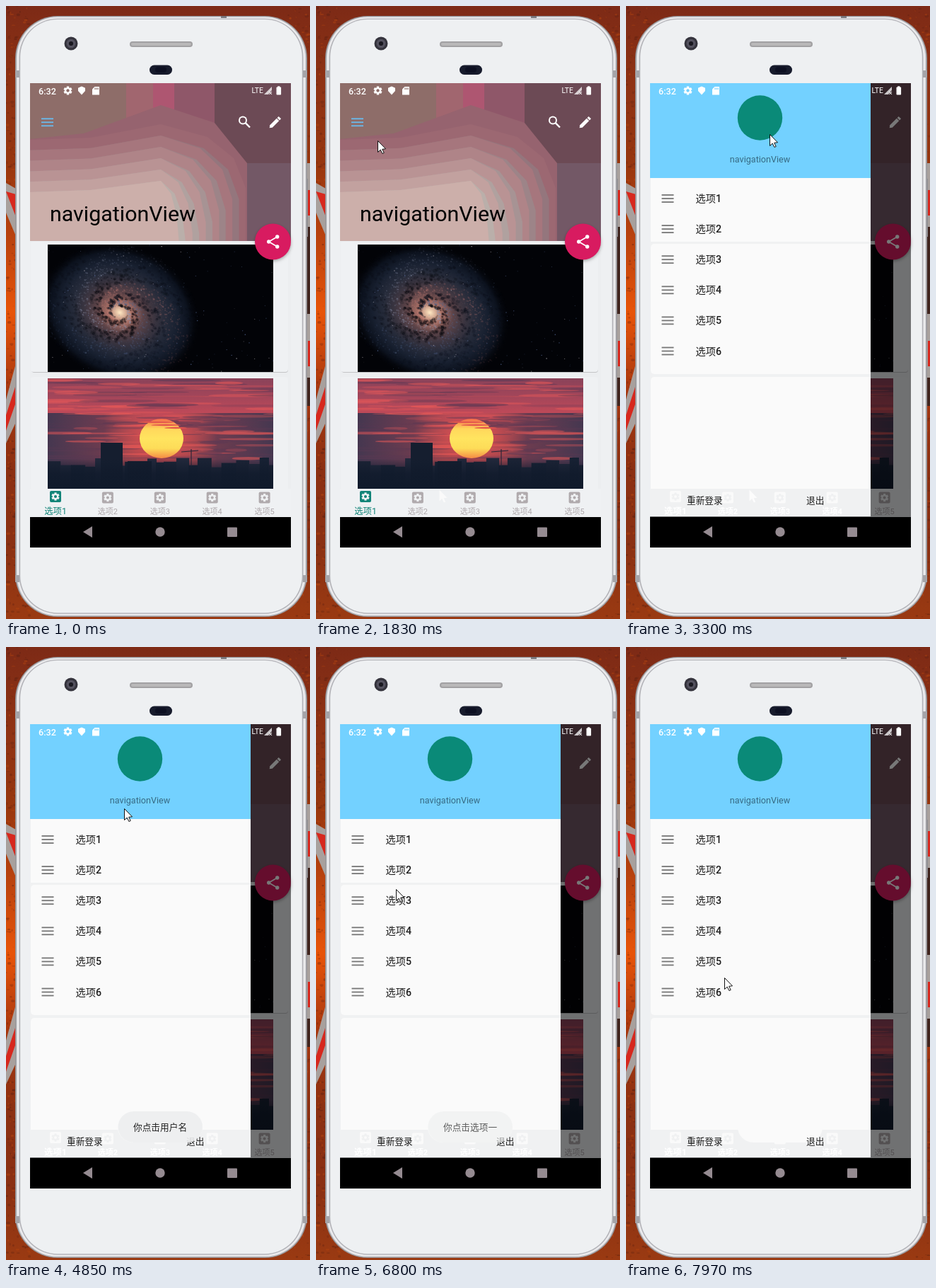
Recreate the animation shown at these times as an HTML page with a canvas. Size 430 by 866 pixels, loop 8000 ms.

```html
<!DOCTYPE html>
<html lang="zh">
<head>
<meta charset="utf-8">
<title>navigationView</title>
<style>
html, body { margin: 0; width: 100%; height: 100%; overflow: hidden; }
canvas { display: block; }
</style>
</head>
<body>
<canvas id="stage" width="430" height="866"></canvas>
<script>
const W = 430, H = 866, LOOP = 8000, TAU = Math.PI * 2;
const FONT = 'Roboto, "Noto Sans CJK SC", "Noto Sans CJK", sans-serif';
const screenCtx = document.getElementById('stage').getContext('2d');
let c = screenCtx;

let seed = 7;
const rnd = (a = 0, b = 1) => a + (b - a) * ((seed = (seed * 16807) % 2147483647) / 2147483647);
const ramp = (t, a, b) => Math.max(0, Math.min(1, (t - a) / (b - a)));
const mix = (a, b, k) => a + (b - a) * k;

function rect(x, y, w, h, color) {
  c.fillStyle = color;
  c.fillRect(x, y, w, h);
}
function round(x, y, w, h, r, color) {
  c.beginPath();
  c.roundRect(x, y, w, h, r);
  c.fillStyle = color;
  c.fill();
}
function oval(x, y, rx, ry, color) {
  c.beginPath();
  c.ellipse(x, y, rx, ry, 0, 0, TAU);
  c.fillStyle = color;
  c.fill();
}
const disc = (x, y, r, color) => oval(x, y, r, r, color);
function trace(pts) {
  c.beginPath();
  for (let i = 0; i < pts.length; i += 2) c.lineTo(pts[i], pts[i + 1]);
}
function poly(pts, color) {
  trace(pts);
  c.fillStyle = color;
  c.fill();
}
function line(pts, color, width) {
  trace(pts);
  c.strokeStyle = color;
  c.lineWidth = width;
  c.stroke();
}
function text(s, x, y, size, color, weight = 400, align = 'left') {
  c.font = `${weight} ${size}px ${FONT}`;
  c.textAlign = align;
  c.fillStyle = color;
  c.fillText(s, x, y);
}
// Evenly spaced colour stops
function blend(g, ...colors) {
  colors.forEach((col, i) => g.addColorStop(i / (colors.length - 1), col));
  return g;
}
const down = (y0, y1, ...colors) => blend(c.createLinearGradient(0, y0, 0, y1), ...colors);
const across = (x0, x1, ...colors) => blend(c.createLinearGradient(x0, 0, x1, 0), ...colors);
function within(x, y, w, h, draw) {
  c.save();
  c.beginPath();
  c.rect(x, y, w, h);
  c.clip();
  draw();
  c.restore();
}

// Icons
function gear(x, y, r, color, hole) {
  for (let i = 0; i < 6; i++) {
    c.save();
    c.translate(x, y);
    c.rotate(i * TAU / 6);
    rect(-r * 0.28, -r, r * 0.56, r, color);
    c.restore();
  }
  disc(x, y, r * 0.76, color);
  disc(x, y, r * 0.36, hole);
}
function bars(x, y, color) {
  for (const dy of [-5, 0, 5]) rect(x - 8.5, y + dy - 0.9, 17, 1.8, color);
}
function tab(i, color, hole, labelColor, weight) {
  const x = 70 + i * 73.9, on = i === 0, y = on ? 693 : 694.5;
  round(x - 8, y - 8, 16, 16, 2, color);
  gear(x, y, 5.6, hole, color);
  text('选项' + (i + 1), x, 717.8, on ? 12.4 : 11, labelColor, weight, 'center');
}
function pencil(x, y, color) {
  c.save();
  c.translate(x, y);
  c.rotate(Math.PI / 4);
  poly([-2.4, -6.4, 2.4, -6.4, 2.4, 7, 0, 10.4, -2.4, 7], color);
  rect(-2.4, -10.4, 4.8, 3, color);
  c.restore();
}
function share(x, y, color) {
  line([x + 6, y - 7, x - 6, y, x + 6, y + 7], color, 1.8);
  for (const dy of [-7, 0, 7]) disc(dy ? x + 6 : x - 6, y + dy, 2.7, color);
}
function arrow(x, y, fill, edge) {
  c.save();
  c.translate(x + 0.5, y + 0.5);
  poly([0, 0, 0, 16, 3.7, 12.6, 6.4, 18, 8.7, 17, 6.2, 11.8, 11, 11.3, 0, 0], fill);
  if (edge) {
    c.strokeStyle = edge;
    c.lineWidth = 1;
    c.stroke();
  }
  c.restore();
}

function backdrop() {
  rect(0, 0, W, H, down(0, H, '#7d2a16', '#8e3214', '#96360f', '#b8420f', '#e85409',
    '#a83810', '#8c3012', '#8a3013', '#9a3a12'));
  const tones = ['#451a12', '#c8500f', '#5e2213'];
  for (let i = 0; i < 900; i++) {
    c.globalAlpha = rnd(0.15, 0.4);
    const x = rnd(-34, 34);
    oval(x < 0 ? W + x : x, rnd(0, H), rnd(0.6, 3), rnd(0.6, 2), tones[i % 3]);
  }
  c.globalAlpha = 1;
  // Red bands with pale edges behind the phone
  const grey = '#a8a09d', red = '#d6281e';
  poly([0, 250, 14, 258, 14, 325, 0, 292], grey);
  poly([0, 262, 14, 266, 14, 298], red);
  poly([14, 505, 14, 588, 0, 618, 0, 556], grey);
  poly([14, 535, 14, 560, 0, 600, 0, 578], red);
  rect(424, 222, 6, 343, '#40241e');
  for (const y of [222, 435]) {
    rect(424, y, 6, 90, grey);
    rect(427, y + 38, 3, 36, red);
  }
}

function phone() {
  rect(424, 244, 3, 82, '#8d8d90');
  const shells = ['#98979b', '#dfdfe2', '#f0f0f2', '#b4b4b9', '#eef0f2'];
  shells.forEach((color, i) => {
    const d = i * 1.8;
    round(13 + d, 14 + d * 0.7, 413 - 2 * d, 849 - 1.5 * d, 60 - d, color);
  });
  for (const x of [13, 420]) for (const y of [91, 804]) rect(x, y, 6, 10, '#a5a4a8');
  rect(304, 14, 8, 3, '#77757a');
  ['#35343d', '#54525f', '#191820'].forEach((color, i) => disc(92, 53, 9.5 - i * 3.2, color));
  round(175, 50, 89, 8, 4, '#a2a1a3');
  round(177, 52, 85, 4, 2, '#b9b8b9');
  round(203, 83.5, 32, 13.5, 6.7, '#171b2c');
  round(211, 86, 16, 8, 4, '#0d1022');
}

function header() {
  within(34, 109, 369, 223, () => {
    const columns = { 34: '#8e6d69', 170: '#a1666f', 208: '#ae5671', 238: '#8f5769', 295: '#6c4a55' };
    for (const x in columns) rect(+x, 109, 369, 223, columns[x]);
    rect(341, 222, 62, 110, '#735866');
    poly([34, 188, 110, 180, 219, 140, 295, 165, 341, 222, 341, 332, 34, 332], '#96636f');
    // Nested contours; the odd ones show only as greyer slivers on the right
    for (let i = 0; i <= 10; i++) {
      const k = Math.ceil(i / 2) / 5, grey = i % 2 * 18;
      const left = mix(189, 263, k), peak = mix(167, 247, k), foot = mix(339, 245, i / 10), w = foot - 219;
      poly([34, left, 120, left - 3, 219, peak, 219 + w * 0.55, peak + 18, foot - w * 0.14, peak + 48,
        foot, peak + 90, foot, 332, 34, 332],
        `rgb(${mix(156, 204, k) - grey},${mix(104, 175, k)},${mix(114, 170, k)})`);
    }
  });
  bars(58.5, 164.3, '#69bbee');
  disc(335, 161.5, 6, '#fff');
  disc(335, 161.5, 4, '#6c4a55');
  line([338.7, 165.2, 345, 171.5], '#fff', 2.4);
  pencil(380, 165, '#fff');
  text('navigationView', 62, 304, 30.4, '#000');
}

function galaxy() {
  within(59, 337, 319, 180, () => {
    rect(59, 337, 319, 180, '#020307');
    c.save();
    c.translate(161, 433);
    c.rotate(0.4);
    c.scale(1.1, 0.9);
    disc(0, 0, 106, blend(c.createRadialGradient(0, 0, 0, 0, 0, 106),
      '#ffe9c4', '#b07468', '#5e4448', '#3c3540', '#262b3a', '#182030', '#0c121e', 'rgba(2,3,7,0)'));
    // Spiral arms: bright dust with dark lanes between
    const tones = ['#8f96b0', '#04060c', '#b0706c', '#070b16', '#52648c', '#04060c'];
    for (let i = 0; i < 2600; i++) {
      const r = rnd(10, 104), arm = i % 6;
      const a = Math.log(r) * 2.4 + arm * TAU / 6 + rnd(-0.5, 0.5);
      c.globalAlpha = rnd(0.1, 0.5) * (1.2 - r / 110);
      disc(Math.cos(a) * r, Math.sin(a) * r, rnd(0.4, arm % 2 ? 2.6 : 1.4), tones[arm]);
    }
    c.restore();
    for (let i = 0; i < 150; i++) {
      c.globalAlpha = rnd(0.2, 0.7);
      disc(rnd(59, 378), rnd(337, 517), rnd(0.3, 0.8), i % 3 ? '#6b82b8' : '#d8d2d8');
    }
    c.globalAlpha = 1;
  });
}

function sunset() {
  within(59, 526, 319, 156, () => {
    rect(59, 526, 319, 156, down(526, 660, '#8a4259', '#a4465a', '#c44a58', '#d84e52', '#c0484e', '#5a3248'));
    rect(59, 575, 319, 80, across(59, 378, '#453750', '#55384fcc', '#e0564a00', '#55384fcc', '#453750'));
    for (let i = 0; i < 130; i++) {
      const y = rnd(528, 640), low = (y - 528) / 112;
      c.globalAlpha = rnd(0.2, 0.6);
      oval(rnd(50, 390), y, rnd(15, 60), rnd(0.6, 2.4), rnd() < 0.35 + low * 0.3 ? '#5b3853' : '#ee5a58');
    }
    c.globalAlpha = 1;
    oval(220, 611, 31, 28, down(583, 639, '#f4694a', '#ffd75c', '#ffe45f', '#fddc58', '#f58a45'));
    for (let i = 0; i < 3; i++) oval(212 + i * 14, 588 + i * 4, 26 - i * 5, 1.2, '#e4584d');
    const tones = ['#1b2335', '#21283b', '#172133'];
    for (let x = 59, i = 0; x < 378; i++) {
      const w = rnd(7, 21), h = rnd(28, 46);
      rect(x, 682 - h, w + 1, h, tones[i % 3]);
      x += w;
    }
    rect(134, 617, 31, 65, '#151e2f');
    rect(172, 643, 34, 39, '#141d2e');
    line([262, 626, 262, 650], '#2a2638', 1.2);
    line([248, 630, 272, 628], '#2a2638', 1);
    rect(59, 640, 319, 42, down(640, 682, '#101a2b00', '#101a2bd0', '#101a2b'));
  });
}

function content() {
  const bg = '#eff1f3', soft = '#958b91';
  rect(34, 109, 369, 613, '#eceef0');
  round(36, 334, 363, 184, 4, '#c3c4c6');
  for (const y of [333, 524]) round(35, y, 364, 184, 4, bg);
  header();
  galaxy();
  sunset();
  rect(34, 682, 369, 40, bg);
  for (let i = 0; i < 5; i++) {
    const color = i ? '#b0aaad' : '#128478';
    tab(i, color, bg, color);
  }
  c.save();
  c.shadowColor = 'rgba(0,0,0,.3)';
  c.shadowBlur = 4;
  c.shadowOffsetY = 2;
  disc(377.5, 333, 25.5, '#d81b60');
  c.restore();
  share(377.7, 333, '#fff');
  rect(34, 722, 369, 43, '#000');
  poly([109, 743, 122, 735, 122, 751], soft);
  disc(218, 743, 6.7, soft);
  round(313, 736.5, 14, 13.5, 1, soft);
}

function status(back) {
  text('6:32', 46, 124.5, 12.6, '#fff', 500);
  gear(87.5, 119.5, 6, '#fff', back);
  poly([107, 113.5, 112, 115.7, 112, 120, 107, 125.5, 102, 120, 102, 115.7], '#fff');
  poly([125.5, 114, 132, 114, 132, 125.5, 122, 125.5, 122, 117.5], '#fff');
  for (let i = 0; i < 3; i++) rect(125.4 + i * 2.1, 115.5, 1.1, 2.6, back);
  text('LTE', 347.5, 123.3, 10.4, '#fff');
  poly([365, 125, 376, 114, 376, 119, 371, 125], 'rgba(255,255,255,.75)');
  line([372.5, 121, 376, 125], '#fff', 1);
  line([376, 121, 372.5, 125], '#fff', 1);
  round(382.5, 114.5, 6.6, 11, 1, '#fff');
  rect(384.3, 113.3, 3, 2, '#fff');
}

function rowGlow(t, start, y) {
  if (t >= start) rect(34, y, 312, 43, `rgba(0,0,0,${0.09 * (1 - ramp(t, start + 150, start + 450))})`);
}

function drawer(t) {
  const paper = '#fafafa', gap = '#f0f1f2', ink = '#1d1d1d';
  rect(34, 243, 312, 478, gap);
  rect(35, 243, 311, t > 7500 ? 100 : 90, paper);
  round(35, 336, 330, 184, 5, paper);
  round(35, 524, 330, 158, [5, 5, 0, 0], paper);
  for (let i = 0; i < 4; i++) tab(i, paper, gap, '#fff', 700);
  if (t < 3600) arrow(174, 683, '#fcfcfc');
  else within(34, 682, 312, 18, () => round(158, 656, 120, 44, 22, paper));
  rect(34, 109, 312, 134, '#73d1ff');
  disc(189.5, 158, 31.7, '#0a8a78');
  text('navigationView', 189.5, 221, 12.6, '#376b84', 400, 'center');
  if (t >= 5550 && t < 6020) disc(107, 274, 10 + 5 * ramp(t, 5550, 5640), 'rgba(0,0,0,.06)');
  rowGlow(t, 6020, 250);
  rowGlow(t, 7430, 294);
  for (let i = 0; i < 6; i++) {
    const y = 272 + i * 43.1;
    bars(59, y, '#777');
    text('选项' + (i + 1), 98.5, y + 5, 14.2, ink, 500);
  }
  text('重新登录', 86, 703.3, 12.7, ink);
  text('退出', 255, 703.3, 12.7, ink);
}

function toast(t) {
  const fade = (from, to) => ramp(t, from, from + 310) * (1 - ramp(t, to, to + 310));
  const level = Math.max(fade(3550, 6250), fade(6580, 7600));
  const label = t < 4500 ? '了头像' : t < 6570 ? '用户名' : '选项一';
  c.globalAlpha = level * 0.9;
  round(158.5, 656, 119.5, 44, 22, '#eeeff0');
  c.globalAlpha = level;
  text('你点击' + label, 180, 682.7, 12.7, '#222');
  c.globalAlpha = 1;
}

// Pointer moves: start, end, target x, target y, bend of the path; it rests in between
const MOVES = [
  [120, 274, 28, 420, 60], [300, 659, 8, 177, 0], [670, 1370, 57, 160, -22], [1660, 1810, 87, 190, 0],
  [2380, 3000, 225, 135, 0], [3070, 3270, 203, 181, 0], [3500, 4270, 167, 228, 0], [4900, 4980, 93, 283, 0],
  [5160, 5290, 107, 274, 0], [6060, 6700, 113, 342, 0], [6880, 7230, 102, 310, 0], [7450, 7890, 139, 467, 0]
];
const TICK = 77;

function pointer(t) {
  if (t < 120 || (t >= 355 && t < 670)) return;
  const q = 120 + Math.floor((t - 120) / TICK) * TICK;
  let x = 346, y = 827;
  for (const [from, to, tx, ty, bend] of MOVES) {
    const k = ramp(q, from, to);
    x = mix(x, tx, k);
    y = mix(y, ty, k) + bend * Math.sin(Math.PI * k);
  }
  arrow(Math.round(x), Math.round(y), '#fff', '#111');
}

const scene = document.createElement('canvas');
scene.width = W;
scene.height = H;
c = scene.getContext('2d');
backdrop();
phone();
content();
c = screenCtx;

function frame(t) {
  const open = t >= 2230;
  c.drawImage(scene, 0, 0);
  if (t >= 274 && !open) arrow(174, 683, '#fafafa');
  if (open) {
    rect(34, 109, 369, 613, `rgba(0,0,0,${0.53 * ramp(t, 2120, 2460)})`);
    within(34, 109, 312, 612, () => {
      if (t < 2300) c.translate(-90, 0);
      drawer(t);
    });
    toast(t);
  }
  status(open ? '#73d1ff' : '#8e6d69');
  pointer(t);
}

const start = performance.now();
function loop() {
  frame((performance.now() - start) % LOOP);
  requestAnimationFrame(loop);
}
loop();
</script>
</body>
</html>
```
